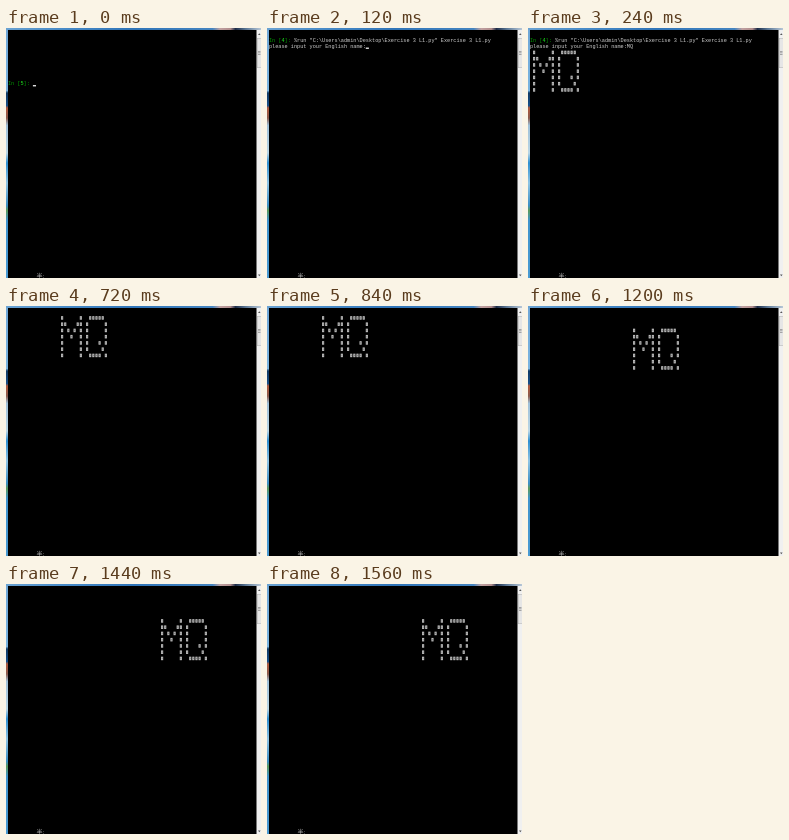
An HTML page with a canvas for the animation above (1680 ms loop, 255 px wide and 250 px high).

```html
<!DOCTYPE html>
<html lang="en">
<head>
<meta charset="utf-8">
<title>Terminal banner</title>
<style>
html, body { margin: 0; width: 100%; height: 100%; overflow: hidden; background: #000; }
canvas { display: block; width: 255px; height: 250px; }
</style>
</head>
<body>
<canvas id="stage" width="255" height="250"></canvas>
<script>
const ctx = document.getElementById('stage').getContext('2d');
const LOOP = 1680;

// Console cells are 8 by 16 units, scaled down to the stage.
const CELL_W = 8, CELL_H = 16, SCALE = 25 / 64;
const LEFT = 1.9, TOP = 9;
const PALE = '#cfcfcf';

const BANNER = [
  '#     #  ##### ',
  '##   ## #     #',
  '# # # # #     #',
  '#  #  # #     #',
  '#     # #   # #',
  '#     # #    # ',
  '#     #  #### #'
];
const COMMAND = '%run "C:\\Users\\admin\\Desktop\\Exercise 3 L1.py" Exercise 3 L1.py';
const QUESTION = 'please input your English name:';

function rect(x, y, w, h, fill) {
  ctx.fillStyle = fill;
  ctx.fillRect(x, y, w, h);
}

function gradient(x, y, stops) {
  const g = ctx.createLinearGradient(0, 0, x, y);
  stops.forEach(([at, colour]) => g.addColorStop(at, colour));
  return g;
}

const edge = gradient(0, 250, [
  [0, '#6fa6d6'], [0.25, '#7ab4e0'], [0.26, '#123a63'], [0.31, '#174f88'],
  [0.32, '#b0583c'], [0.36, '#8a5a4c'], [0.39, '#9fc0d8'], [0.5, '#b9d6e6'],
  [0.54, '#2f8fd0'], [0.62, '#8fc4e4'], [0.71, '#3d8fc4'],
  [0.73, '#5a9a5c'], [0.77, '#3f93cc'], [1, '#4a9ad2']
]);
const topEdge = gradient(255, 0, [
  [0, '#6aa2d2'], [0.2, '#4a8cc8'], [0.5, '#2f74b8'], [0.81, '#4484c0'],
  [0.84, '#c0a0a0'], [0.88, '#b08c8c'], [0.9, '#1c2c48'],
  [0.94, '#5a7694'], [1, '#b8c8d8']
]);

function drawWindow() {
  rect(0, 0, 255, 250, '#000');
  rect(0, 0, 2, 250, edge);
  rect(0, 0, 255, 2, topEdge);
  rect(250.5, 2, 4.5, 248, '#f0f0f0');
  rect(251, 10, 4, 30, '#b4b4b4');
  rect(251.5, 10.5, 3.5, 29, '#e6e6e6');
  for (let y = 23; y < 27; y += 1.5) rect(252, y, 2.5, 0.7, '#888');
  ctx.fillStyle = '#555';
  ctx.beginPath();
  ctx.moveTo(252, 7);
  ctx.lineTo(253.3, 5.2);
  ctx.lineTo(254.6, 7);
  ctx.moveTo(252, 246.5);
  ctx.lineTo(253.3, 248.3);
  ctx.lineTo(254.6, 246.5);
  ctx.fill();
  ctx.fillStyle = '#bdbdbd';
  ctx.font = '6px "Noto Sans CJK SC", "Noto Sans CJK", sans-serif';
  ctx.fillText('半:', 30.5, 249.8);
}

function inCells(draw) {
  ctx.save();
  ctx.translate(LEFT, TOP);
  ctx.scale(SCALE, SCALE);
  draw();
  ctx.restore();
}

function write(text, col, row, colour = PALE) {
  ctx.font = '13.33px "Liberation Mono", monospace';
  ctx.fillStyle = colour;
  [...text].forEach((ch, i) => ctx.fillText(ch, (col + i) * CELL_W, row * CELL_H + 12));
}

function prompt(count, row) {
  write('In [', 0, row, '#009a00');
  write(String(count), 4, row, '#20f020');
  write(']:', 5, row, '#009a00');
}

function cursor(col, row) {
  rect(col * CELL_W, row * CELL_H + 11, CELL_W, 3.5, '#e4e4e4');
}

function banner(col, row) {
  BANNER.forEach((line, r) => [...line].forEach((ch, c) => {
    if (ch !== '#') return;
    const x = (col + c) * CELL_W, y = (row + r) * CELL_H;
    rect(x, y + 3, 5.5, 9, '#c0c0c0');
    rect(x + 1.8, y + 5.5, 2, 4, '#777');
  }));
}

function drawConsole(t) {
  if (t < 120) {
    prompt(5, 7);
    cursor(8, 7);
  } else if (t < 720) {
    prompt(4, 0);
    write(COMMAND, 8, 0);
    write(QUESTION, 0, 1);
    if (t < 240) {
      cursor(QUESTION.length, 1);
    } else {
      write('MQ', QUESTION.length, 1);
      banner(1, 2);
    }
  } else {
    const step = t < 1200 ? 0 : t < 1440 ? 1 : 2;
    banner(17 + 16 * step, 2 * step);
  }
}

const start = performance.now();
function frame() {
  const t = (performance.now() - start) % LOOP;
  drawWindow();
  inCells(() => drawConsole(t));
  requestAnimationFrame(frame);
}
frame();
</script>
</body>
</html>
```
